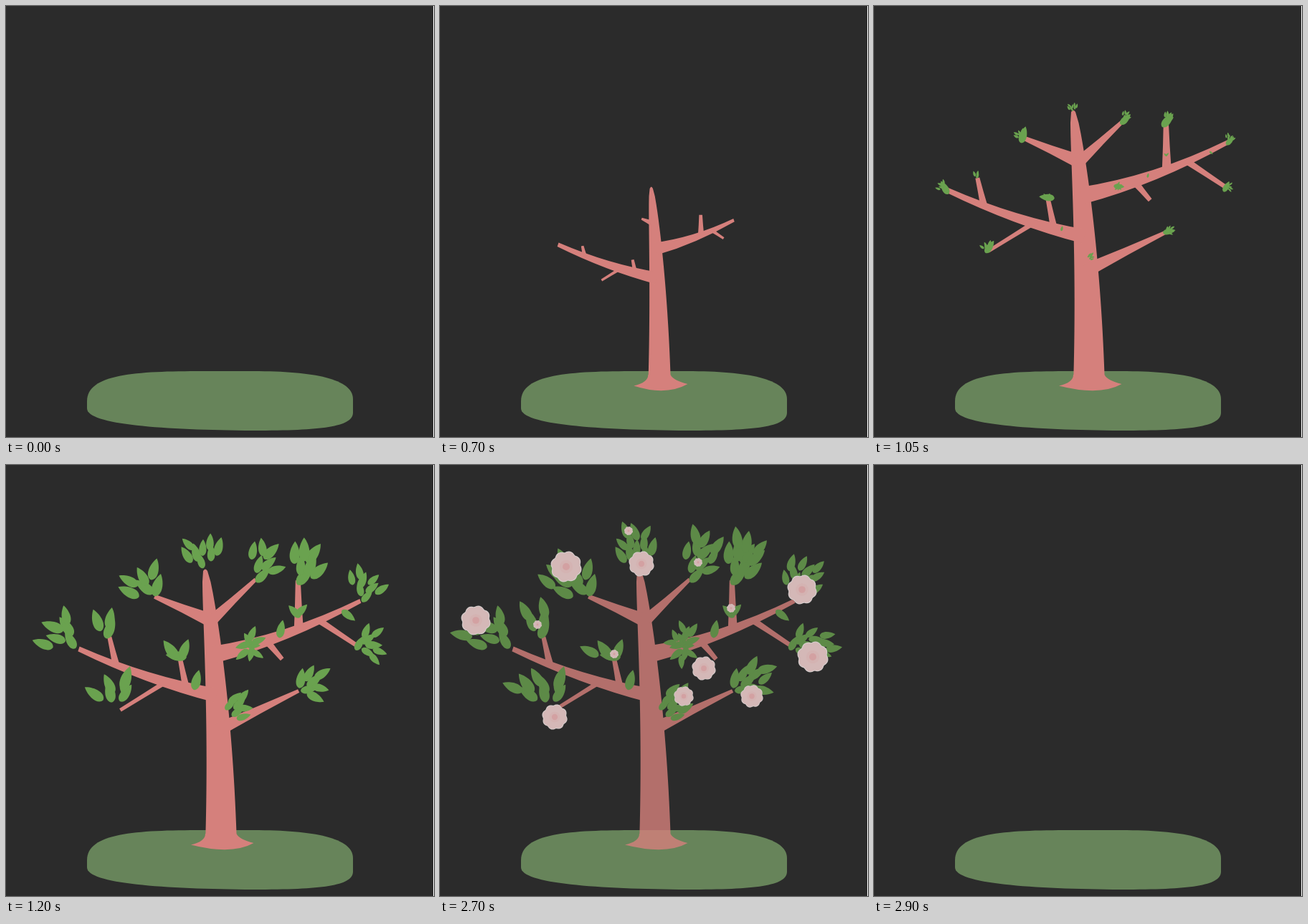
Write an HTML page with a canvas that moves like this. It is 597x602 px and loops after 3.1 s.

```html
<!DOCTYPE html>
<html lang="en">
<head>
<meta charset="utf-8">
<title>Growing tree</title>
<style>
  html, body { margin: 0; width: 100%; height: 100%; overflow: hidden; background: #2b2b2b; }
  canvas { position: absolute; left: 0; top: 0; display: block; }
</style>
</head>
<body>
<canvas id="ground" width="597" height="602"></canvas>
<canvas id="tree" width="597" height="602"></canvas>
<script>
const LOOP = 3100, STEP = 50, GROWN = 1050;
const BARK = '#d5807c', LEAF = '#6aa24f', GRASS = '#67845a';
const groundCtx = document.getElementById('ground').getContext('2d');
const treeEl = document.getElementById('tree');
const ctx = treeEl.getContext('2d');

const clamp = v => Math.max(0, Math.min(1, v));
const span = (t, a, b) => clamp((t - a) / (b - a));
const mix = (a, b, k) => a + (b - a) * k;

let seed = 7;
const random = () => (seed = seed * 16807 % 2147483647) / 2147483647;

// Centre and half width of the trunk at height h (0 to 1)
function trunkAt(h, t) {
  const g = span(t, -200, GROWN);
  return {
    x: 322 - 22 * g - 22 * g * g * h * h,
    y: 530 - 382 * g * h,
    w: g * (3 + 19 * (1 - h) ** .6),
    base: 15 / (382 * g)
  };
}

// A branch leaves its parent at fraction u and grows along (dx, dy)
const branches = {};
function branch(name, parent, u, dx, dy, w, tip, start, sag = 0) {
  branches[name] = { parent, u, dx, dy, w, tip, start, sag };
}

branch('left', 'trunk', .545, -192, -65, 20, 7, -200, 6);
branch('leftUp', 'left', .73, -9, -39, 10, 6, 500);
branch('leftMid', 'left', .22, -9, -44, 10, 6, 450);
branch('leftLow', 'left', .37, -63, 39, 7, 5, 450);
branch('right', 'trunk', .694, 205, -75, 24, 6, 300, 8);
branch('rightUp', 'right', .58, -1, -68, 13, 7, 450);
branch('rightLow', 'right', .72, 54, 36, 9, 6, 550);
branch('rightNear', 'right', .36, 22, 26, 10, 6, 700);
branch('topLeft', 'trunk', .82, -78, -33, 19, 6, 600);
branch('topRight', 'trunk', .815, 63, -59, 16, 5, 750);
branch('low', 'trunk', .42, 112, -54, 19, 5, 750);

function pointOn(name, u, t) {
  if (name === 'trunk') return trunkAt(u, t);
  const b = branches[name];
  const root = pointOn(b.parent, b.u, t);
  const len = span(t, b.start, GROWN);
  return {
    x: root.x + b.dx * len * u,
    y: root.y + (b.dy * u + 4 * b.sag * u * (1 - u)) * len
  };
}

// Leaves on a sunflower spiral around (dx, dy) from a point of a branch;
// they point away from that point and open from the nearest to the farthest.
const sprays = [];
function spray(name, u, dx, dy, rx, ry, count, size, bud = true) {
  const leaves = Array.from({ length: count }, (_, i) => {
    const a = i * 2.4 + dx, r = Math.sqrt((i + .5) / count);
    const x = dx + rx * r * Math.cos(a), y = dy + ry * r * Math.sin(a);
    return {
      x, y,
      angle: Math.atan2(y, x) + (random() - .5) * .7,
      size: size * mix(.88, 1.08, random())
    };
  });
  leaves.sort((p, q) => Math.hypot(p.x, p.y) - Math.hypot(q.x, q.y));
  sprays.push({ name, u, leaves, bud });
}

spray('left', 1, -39, -25, 37, 28, 9, 31);
spray('leftUp', 1, -6, -28, 23, 20, 5, 31, false);
spray('leftMid', 1, -14, -6, 26, 10, 4, 31);
spray('leftLow', 1, -20, -33, 42, 17, 9, 32);
spray('topLeft', 1, -25, -29, 36, 30, 10, 32);
spray('trunk', 1, -5, -38, 26, 28, 12, 25, false);
spray('topRight', 1, 18, -34, 27, 32, 11, 28);
spray('rightUp', 1, 18, -33, 28, 30, 11, 31);
spray('right', 1, 13, -32, 30, 27, 13, 23);
spray('rightLow', 1, 28, -3, 32, 24, 13, 23);
spray('right', .25, -2, -4, 20, 28, 13, 21);
spray('trunk', .46, 34, -24, 19, 22, 11, 23, false);
spray('low', 1, 28, -16, 28, 26, 11, 27);
// Strays along the wood
spray('left', .17, 5, -14, 0, 0, 1, 30, false);
spray('right', .45, 2, -10, 0, 0, 1, 26, false);
spray('right', .87, 10, 7, 0, 0, 1, 23, false);
spray('rightUp', .3, 0, -6, 9, 3, 2, 22, false);

const buds = [[136, 223], [243, 264], [263, 92], [360, 136], [406, 200]];
const roses = [
  [50, 217, 21], [176, 142, 22], [281, 138, 18], [505, 174, 21], [520, 268, 22],
  [368, 284, 17], [340, 323, 14], [435, 323, 16], [160, 352, 18]
];

function drawGround() {
  groundCtx.fillStyle = GRASS;
  groundCtx.fill(new Path2D('M113 552C113 514 180 510 275 510L345 510C430 510 484 521 484 549L484 568' +
    'C484 588 440 593 345 593C220 592 113 585 113 562Z'));
  groundCtx.fillStyle = '#fff';
  groundCtx.fillRect(596, 0, 1, 602);
}

function drawTrunk(t) {
  const foot = trunkAt(0, t), top = trunkAt(1, t);
  const left = foot.x - foot.w;
  const edge = side => Array.from({ length: 25 }, (_, i) => {
    const p = trunkAt(mix(foot.base, 1, i / 24), t);
    return [p.x + side * p.w, p.y];
  });
  ctx.beginPath();
  edge(-1).forEach(p => ctx.lineTo(...p));
  ctx.quadraticCurveTo(top.x, top.y - 5, top.x + top.w, top.y);
  edge(1).reverse().forEach(p => ctx.lineTo(...p));
  ctx.quadraticCurveTo(325, 523, 345.5, 528);
  ctx.quadraticCurveTo(315, 545, left - 20, 530.5);
  ctx.quadraticCurveTo(left, 526, left, 515);
  ctx.fill();
}

function drawBranch(name, t) {
  const { w, tip, start, sag } = branches[name];
  const len = span(t, start, GROWN);
  if (!len) return;
  const a = pointOn(name, 0, t), b = pointOn(name, 1, t);
  const dist = Math.hypot(b.x - a.x, b.y - a.y), thick = Math.sqrt(len) / 2;
  const nx = (a.y - b.y) / dist * thick, ny = (b.x - a.x) / dist * thick;
  const mx = (a.x + b.x) / 2, my = (a.y + b.y) / 2 + 2 * sag * len;
  const mid = mix(tip, w, .35);
  ctx.beginPath();
  ctx.moveTo(a.x + nx * w, a.y + ny * w);
  ctx.quadraticCurveTo(mx + nx * mid, my + ny * mid, b.x + nx * tip, b.y + ny * tip);
  ctx.lineTo(b.x - nx * tip, b.y - ny * tip);
  ctx.quadraticCurveTo(mx - nx * mid, my - ny * mid, a.x - nx * w, a.y - ny * w);
  ctx.fill();
}

const leafPath = new Path2D('M-.5 0C-.45-.28 .05-.32 .5 0C.2 .24-.4 .34-.5 0Z');

function drawLeaf(x, y, angle, size) {
  if (size < .5) return;
  ctx.save();
  ctx.translate(x, y);
  ctx.rotate(angle);
  ctx.scale(size, size);
  ctx.fill(leafPath);
  ctx.restore();
}

function drawSpray({ name, u, leaves, bud }, t) {
  const at = pointOn(name, u, t);
  const open = span(t, 1000, 1200), full = span(t, 1200, 1500);
  leaves.forEach((leaf, i) => {
    const early = i < leaves.length * .6;
    const reach = early ? open : mix(.6, 1, full);
    let grow = early ? open : full;
    if (bud && i === 0) grow = mix(.65, 1, open) * span(t, 750, 900);
    drawLeaf(at.x + leaf.x * reach, at.y + leaf.y * reach, leaf.angle, leaf.size * grow);
  });
}

function disc(x, y, r, color) {
  ctx.fillStyle = color;
  ctx.beginPath();
  ctx.arc(x, y, r, 0, Math.PI * 2);
  ctx.fill();
}

function scallop(x, y, r, color) {
  ctx.fillStyle = color;
  ctx.beginPath();
  for (let i = 0; i < 72; i++) {
    const a = i / 72 * Math.PI * 2;
    const d = r * (.89 + .11 * Math.abs(Math.sin(a * 4 + .5)));
    ctx.lineTo(x + d * Math.cos(a), y + d * Math.sin(a));
  }
  ctx.fill();
}

function drawBlossom(x, y, r) {
  if (r < .5) return;
  scallop(x, y, r, '#fff4f3');
  scallop(x, y, r * .94, '#ffdcdb');
  disc(x, y, r * .42, '#ffd5d4');
  disc(x, y, r * .23, '#fdbfc0');
}

function drawTree(t) {
  ctx.clearRect(0, 0, 597, 602);
  if (t < STEP) return;
  ctx.fillStyle = BARK;
  drawTrunk(t);
  Object.keys(branches).forEach(name => drawBranch(name, t));
  ctx.fillStyle = LEAF;
  sprays.forEach(s => drawSpray(s, t));
  const bloom = span(t, 1200, 1500);
  roses.forEach(([x, y, r]) => drawBlossom(x, y, r * bloom));
  buds.forEach(([x, y]) => drawBlossom(x, y, 6 * bloom));
}

const start = performance.now();
function frame() {
  const t = Math.floor((performance.now() - start) % LOOP / STEP) * STEP;
  drawTree(t);
  treeEl.style.opacity = 1 - span(t, 2650, 2900);
  requestAnimationFrame(frame);
}

drawGround();
frame();
</script>
</body>
</html>
```
